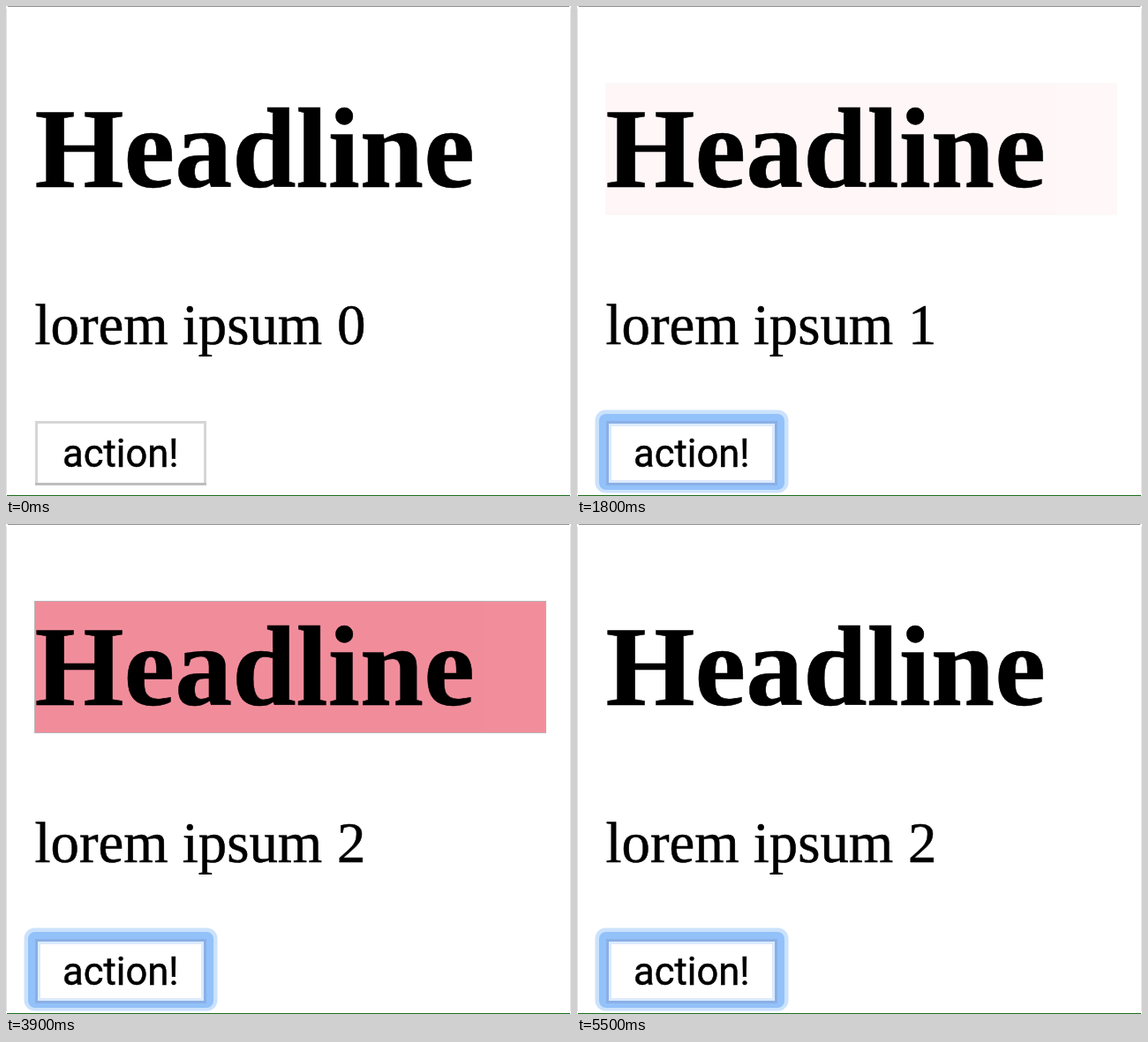
Write an HTML page that moves like this. It is 640 by 555 pixels and loops after 5600 ms.

```html
<!DOCTYPE html>
<html lang="en">
<head>
<meta charset="utf-8">
<title>Headline flash</title>
<style>
  html, body { margin: 0; width: 100%; height: 100%; overflow: hidden; background: #fff; }
  svg { display: block; width: 640px; height: 555px; }
  text { stroke: #000; stroke-width: .5px; }
  .serif { font-family: "Liberation Serif", Times, serif; }
  .flash, .focus, .idle, .n0, .n1, .n2 { animation: 5600ms step-end infinite; }
  .flash { animation-name: flash; }
  .focus { animation-name: focus; }
  .idle { animation-name: idle; }
  .n0 { animation-name: zero; }
  .n1 { animation-name: one; }
  .n2 { animation-name: two; }

  /* Each click flashes the headline, fading in 100 ms steps. */
  @keyframes flash {
    0% { opacity: 0; }
    17.85% { opacity: .94; animation-timing-function: steps(8); }
    32.13% { opacity: .035; }
    33.92% { opacity: 0; }
    62.49% { opacity: .92; animation-timing-function: steps(7); }
    74.99% { opacity: .17; }
    76.78%, 100% { opacity: 0; }
  }
  @keyframes focus { 0% { opacity: 0; } 14.28%, 100% { opacity: 1; } }
  @keyframes idle { 0% { opacity: 1; } 14.28%, 100% { opacity: 0; } }
  @keyframes zero { 0% { opacity: 1; } 17.85%, 100% { opacity: 0; } }
  @keyframes one { 0% { opacity: 0; } 17.85% { opacity: 1; } 62.49%, 100% { opacity: 0; } }
  @keyframes two { 0% { opacity: 0; } 62.49%, 100% { opacity: 1; } }
</style>
</head>
<body>
<svg viewBox="0 0 640 555">
  <rect width="640" height="555" fill="#fff"/>

  <!-- window edge -->
  <path d="M.5 3V552M639.5 3V552" stroke="#e2e2e2"/>
  <path d="M2 .5H638" stroke="#909090"/>
  <path d="M1 554.5H639" stroke="#1c6e20"/>

  <rect class="flash" x="32.5" y="87.5" width="579" height="149" fill="#e41834" stroke="#77636a"/>
  <text class="serif" x="32.5" y="204.5" font-size="130" font-weight="700">Headline</text>

  <g class="serif" font-size="64.8">
    <text x="32.5" y="382.5">lorem ipsum</text>
    <text class="n0" x="375" y="382.5">0</text>
    <text class="n1" x="375" y="382.5">1</text>
    <text class="n2" x="375" y="382.5">2</text>
  </g>

  <g class="idle">
    <rect x="34.5" y="471.5" width="191" height="70" fill="#fff" stroke="#d6d6d6" stroke-width="3"/>
    <path d="M33 541.5H227" stroke="#bdbdbd" stroke-width="3"/>
  </g>
  <g class="focus">
    <rect x="20.5" y="457.5" width="219" height="94" rx="12" fill="#cbe2fc"/>
    <rect x="25" y="462" width="210" height="86" rx="8" fill="#93c1f9"/>
    <rect x="34.5" y="471.5" width="191" height="70" fill="#dceafc" stroke="#8ab0e6" stroke-width="3"/>
    <rect x="39" y="476" width="182" height="61" fill="#fff"/>
  </g>
  <text x="64" y="522" font-size="43.6" font-family="Roboto, Inter, sans-serif">action!</text>
</svg>
</body>
</html>
```
